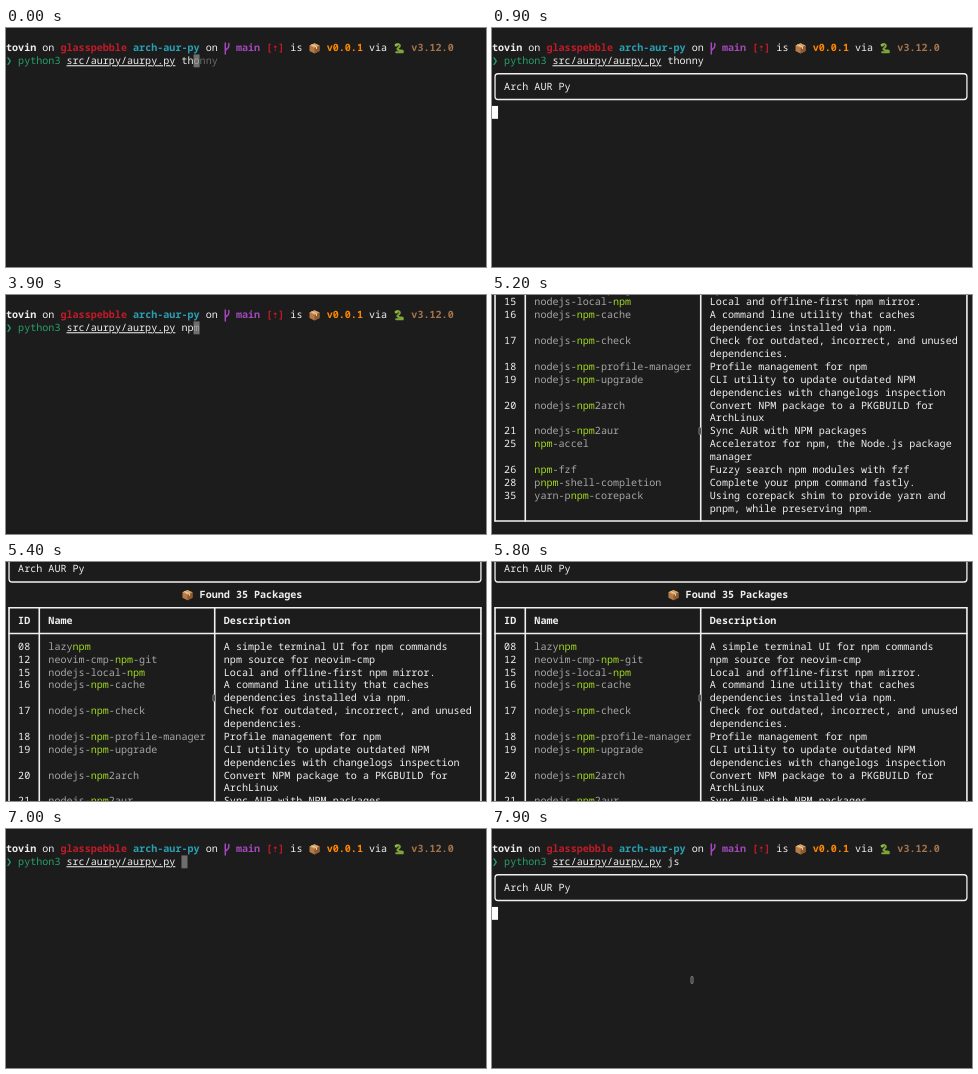
These frames come from a looping animation (480 px wide and 239 px high, 8 s). An HTML page:

```html
<!DOCTYPE html>
<html lang="en">
<head>
<meta charset="utf-8">
<title>Terminal session</title>
<style>
  html, body { margin: 0; width: 100%; height: 100%; overflow: hidden; background: #1c1c1c; }
  svg { display: block; width: 480px; height: 239px; }
  text {
    font: 10.08px "Noto Sans Mono", "DejaVu Sans Mono", monospace;
    white-space: pre;
    text-rendering: geometricPrecision;
  }
  .b { font-weight: 700; }
  .u { text-decoration: underline; }
</style>
</head>
<body>
<svg id="term" viewBox="0 0 480 239"></svg>
<script>
const LOOP = 8000;
const CW = 6.05, RH = 12.88, MID = 7.1;
const WHITE = '#f0f0f0', RED = '#c01c28', CYAN = '#2aa1b3', PURPLE = '#a347ba',
      GREEN = '#26a269', ORANGE = '#ff8700', BROWN = '#a2734c',
      DIM = '#a6a6a6', GHOST = '#6a6a6a', HIT = '#a0d820';

const COMMAND = 'python3 src/aurpy/aurpy.py ';

const thonny = {
  query: 'thonny', count: 2, took: '4s', split: 18, right: 46, titleCol: 14,
  rows: [
    ['1', 'thonny', 'Python IDE for beginners'],
    ['2', 'thonny-git', 'Python IDE for beginners.'],
  ],
};
const npm = {
  query: 'npm', count: 35, took: '7s', split: 34, right: 78, titleCol: 29,
  rows: [
    ['08', 'lazynpm', 'A simple terminal UI for npm commands'],
    ['12', 'neovim-cmp-npm-git', 'npm source for neovim-cmp'],
    ['15', 'nodejs-local-npm', 'Local and offline-first npm mirror.'],
    ['16', 'nodejs-npm-cache', 'A command line utility that caches', 'dependencies installed via npm.'],
    ['17', 'nodejs-npm-check', 'Check for outdated, incorrect, and unused', 'dependencies.'],
    ['18', 'nodejs-npm-profile-manager', 'Profile management for npm'],
    ['19', 'nodejs-npm-upgrade', 'CLI utility to update outdated NPM', 'dependencies with changelogs inspection'],
    ['20', 'nodejs-npm2arch', 'Convert NPM package to a PKGBUILD for', 'ArchLinux'],
    ['21', 'nodejs-npm2aur', 'Sync AUR with NPM packages'],
    ['25', 'npm-accel', 'Accelerator for npm, the Node.js package', 'manager'],
    ['26', 'npm-fzf', 'Fuzzy search npm modules with fzf'],
    ['28', 'pnpm-shell-completion', 'Complete your pnpm command fastly.'],
    ['35', 'yarn-pnpm-corepack', 'Using corepack shim to provide yarn and', 'pnpm, while preserving npm.'],
  ],
};
const js = { query: 'js' };

const midY = row => row * RH + MID;

function put(row, col, str, color = WHITE, cls = '') {
  if (!str) return '';
  return `<text x="${col * CW}" y="${midY(row) + 3.4}" fill="${color}" class="${cls}">${str}</text>`;
}

// Places [text, color, class] runs one after another.
function runs(row, col, list) {
  return list.map(([str, color, cls]) => {
    const out = put(row, col, str, color, cls);
    col += str.length;
    return out;
  }).join('');
}

const line = (d, color, width) =>
  `<path d="${d}" fill="none" stroke="${color}" stroke-width="${width}" stroke-linecap="round"/>`;

const block = (row, col, color) =>
  `<rect x="${col * CW}" y="${midY(row) - RH / 2}" width="${CW}" height="${RH}" fill="${color}"/>`;

const icon = (row, col, body) =>
  `<g transform="translate(${col * CW} ${midY(row) - 6})">${body}</g>`;

const crate = (row, col) => icon(row, col,
  '<path d="M1 3.5 6 1.2 11 3.5V9L6 11.5 1 9Z" fill="#b57a45"/>' +
  '<path d="M6 5.8 11 3.5V9L6 11.5Z" fill="#8f5b30"/>' +
  '<path d="M1 3.5 6 1.2 11 3.5 6 5.8Z" fill="#d6a068"/>' +
  '<path d="M3 2.6 8 4.9V7" fill="none" stroke="#ecd2a8"/>');

const snake = (row, col) => icon(row, col,
  line('M3 3.2C5 1 8 3 6 5S3 7.5 6 8.2 10 8 9.5 10.2H3', '#7fa53a', 2) +
  '<circle cx="3" cy="3" r="1.6" fill="#8fb844"/>');

const branch = (row, col) => icon(row, col,
  line('M1.5 1V12M1.5 9C1.5 6.5 5 7.5 5 4V1.5', PURPLE, 1.5));

function prompt(row, took) {
  return runs(row, 0, [
    ['tovin', WHITE, 'b'], [' on '], ['glasspebble', RED, 'b'], [' '],
    ['arch-aur-py', CYAN, 'b'], [' on'],
  ].map(r => r)) +
    branch(row, 36) + put(row, 38, 'main', PURPLE, 'b') + put(row, 43, '[⇡]', RED, 'b') +
    put(row, 47, 'is') + crate(row, 50) + put(row, 53, 'v0.0.1', ORANGE, 'b') +
    put(row, 60, 'via') + snake(row, 64) + put(row, 67, 'v3.12.0', BROWN, 'b') +
    (took ? put(row, 75, 'took') + put(row + 1, 1, took, BROWN, 'b') + put(row + 2, 0, '❯', GREEN) : '');
}

function command(typed, ghost, active) {
  const end = 2 + typed.length;
  let out = put(2, 0, '❯', GREEN, 'b') +
    put(2, 2, typed.slice(0, 7), GREEN) +
    put(2, 10, typed.slice(8, 26), WHITE, 'u') +
    put(2, 29, typed.slice(27));
  if (active) {
    out += block(2, end, '#6e6e6e') +
      put(2, end, ghost[0], '#a0a0a0') + put(2, end + 1, ghost.slice(1), GHOST);
  }
  return out;
}

const panel = () =>
  `<rect x="${CW / 2}" y="${midY(3)}" width="${78 * CW}" height="${2 * RH}" rx="3"
    fill="none" stroke="${WHITE}" stroke-width="1.3"/>` + put(4, 2, 'Arch AUR Py');

const bottomRow = s => 10 + s.rows.reduce((n, r) => n + r.length - 2, 0);

function table(s) {
  const x = col => (col + 0.5) * CW;
  const top = midY(7), sep = midY(9), bottom = midY(bottomRow(s));
  let out = crate(6, s.titleCol) + put(6, s.titleCol + 3, `Found ${s.count} Packages`, WHITE, 'b') +
    put(8, 2, 'ID', WHITE, 'b') + put(8, 7, 'Name', WHITE, 'b') +
    put(8, s.split + 2, 'Description', WHITE, 'b');
  for (const y of [top, sep, bottom]) out += line(`M${x(0)} ${y}H${x(s.right)}`, WHITE, 1.6);
  for (const c of [0, 5, s.split, s.right]) out += line(`M${x(c)} ${top}V${bottom}`, WHITE, 1.6);

  let row = 10;
  for (const [id, name, ...about] of s.rows) {
    const parts = name.split(new RegExp(`(${s.query})`));
    out += put(row, 2, id) +
      runs(row, 7, parts.map(p => [p, p === s.query ? HIT : DIM]));
    for (const str of about) out += put(row++, s.split + 2, str);
  }
  return out;
}

const question = row => crate(row, 0) + runs(row, 3, [
  ['Select One Package '], ['(', WHITE, 'b'], ['1', CYAN, 'b'], [' or '], ['2', CYAN, 'b'],
  [' or '], ['...', DIM], [')', WHITE, 'b'], [':'],
]);

const TYPE = 0, RUN = 1, PANEL = 2, TABLE = 3, STOP = 4, DONE = 5;

function screen({ s, stage, typed, ghost = '', scroll = 0, mouse }) {
  const cmd = typed ?? COMMAND + s.query;
  let out = prompt(1) + command(cmd, ghost, stage === TYPE);
  if (stage === RUN) out += block(3, 0, '#fff');
  if (stage >= PANEL) out += panel();
  if (stage === PANEL) out += block(6, 0, '#fff');
  if (stage >= TABLE) {
    const ask = bottomRow(s) + 2;
    out += table(s) + question(ask);
    if (stage === TABLE) out += block(ask, 39, '#fff');
    if (stage >= STOP) {
      out += put(ask, 39, '^C') +
        runs(ask + 1, 0, [['Error', RED], [': Terminated With CTRL + C.']]);
    }
    if (stage === DONE) out += prompt(ask + 3, s.took);
  }
  out = `<g transform="translate(0 ${-scroll * RH})">${out}</g>`;
  if (mouse) {
    out += `<rect x="${mouse[0] - 1}" y="${mouse[1] - 3.5}" width="2" height="7" rx="1"
      fill="#1c1c1c" stroke="#aaa" stroke-width=".8"/>`;
  }
  return out;
}

const steps = [];
const at = (t, s, stage, more) => steps.push({ t, s, stage, ...more });
const type = (t, s, typed, ghost) => at(t, s, TYPE, { typed, ghost });
const scrollTo = (t, scroll) => at(t, npm, TABLE, { scroll, mouse: [208, 136] });

type(0, thonny, COMMAND + 'th', 'onny');
type(100, thonny, COMMAND + 'thonny');
at(300, thonny, RUN);
at(500, thonny, PANEL);
at(1000, thonny, TABLE);
at(1800, thonny, STOP);
at(2000, thonny, DONE);

type(2500, npm, '');
type(3400, npm, 'p', COMMAND.slice(1) + 'thonny');
type(3500, npm, COMMAND + 'thonny');
type(3700, npm, COMMAND);
type(3800, npm, COMMAND + 'n', 'pm');
type(3900, npm, COMMAND + 'np', 'm');
type(4000, npm, COMMAND + 'npm');
at(4300, npm, RUN);
at(4500, npm, PANEL);
at(5000, npm, TABLE, { scroll: 12 });
[[5200, 12], [5300, 9], [5400, 4], [5500, 1], [5600, 0], [5800, 4], [5900, 9], [6000, 12]]
  .forEach(([t, n]) => scrollTo(t, n));
at(6300, npm, DONE, { scroll: 17 });

type(6600, js, '');
type(6800, js, 'p', COMMAND.slice(1) + 'npm');
type(6900, js, COMMAND + 'npm');
type(7000, js, COMMAND);
type(7100, js, COMMAND + 'j');
type(7200, js, COMMAND + 'js');
at(7400, js, RUN);
at(7600, js, PANEL, { mouse: [200, 151] });

const term = document.getElementById('term');
let shown;

function tick(now) {
  const t = now % LOOP;
  const step = steps.findLast(k => k.t <= t);
  if (step !== shown) {
    shown = step;
    term.innerHTML = screen(step);
  }
  requestAnimationFrame(tick);
}
tick(0);
</script>
</body>
</html>
```
